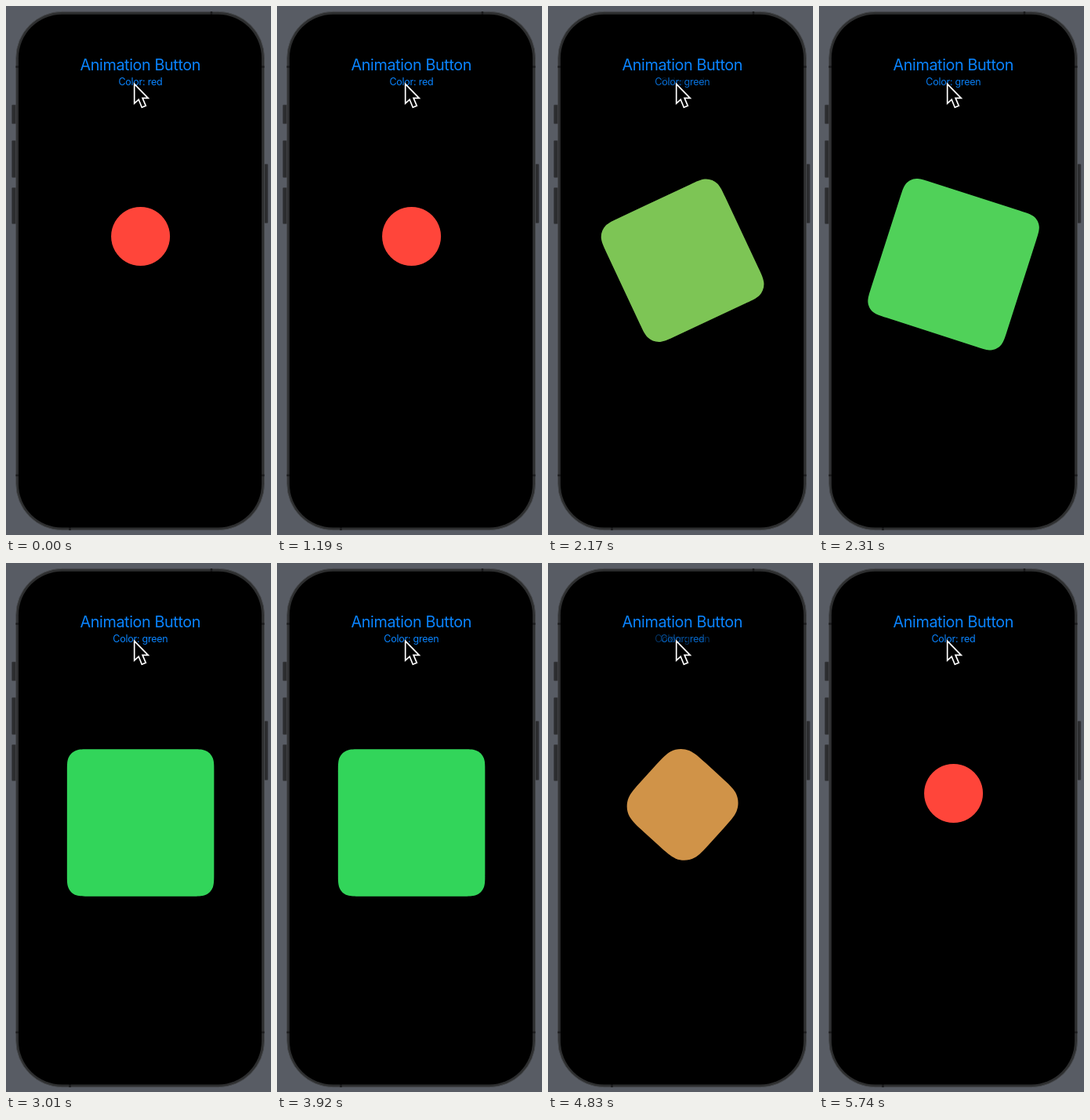
Recreate the animation shown at these times as an HTML page. Size 338x674 px, loop 5880 ms.

```html
<!DOCTYPE html>
<html lang="en">
<head>
<meta charset="utf-8">
<title>Animation Button</title>
<style>
  html, body { margin: 0; width: 100%; height: 100%; overflow: hidden; background: #585c64; }
  svg { display: block; width: 338px; height: 674px; }
  text {
    font-family: Inter, Roboto, sans-serif;
    letter-spacing: -0.02em;
    text-anchor: middle;
    fill: #0a84ff;
  }
  .title { font-size: 19.8px; }
  .label { font-size: 12.5px; }
</style>
</head>
<body>
<svg viewBox="0 0 338 674">
  <g fill="#2c2d2f" stroke="#3d3f43" stroke-width=".6">
    <rect x="7.5" y="126" width="6" height="24" rx="1"/>
    <rect x="7.5" y="171.5" width="6" height="47" rx="1"/>
    <rect x="7.5" y="231.5" width="6" height="46" rx="1"/>
    <rect x="329" y="201.5" width="5" height="75" rx="1"/>
  </g>
  <rect x="12.8" y="7.3" width="316.7" height="660.4" rx="59" fill="#2d2e2f" stroke="#484a4d" stroke-width=".9"/>
  <path d="M12.5 77.5h3.5M326 77.5h3.5M12.5 598h3.5M326 598h3.5M262 7v4M81.5 664v4" stroke="#1b1b1c" stroke-width="2.5"/>
  <rect x="16" y="10.8" width="310" height="653.6" rx="55.5"/>
  <text class="title" x="171.3" y="82.3">Animation Button</text>
  <text class="label" id="red" x="171.4" y="101.4">Color: red</text>
  <text class="label" id="green" x="171.4" y="101.4">Color: green</text>
  <path id="shape"/>
  <path d="M163.7 99.3V124.2L169.2 119.2L173.3 129.2L178.3 127.1L174.1 117.3H181.3Z" fill="#000" stroke="#fff" stroke-width="1.7"/>
</svg>
<script>
const LOOP = 5880, STEP = 70;
const GROW = 1900, SHRINK = 4650, OMEGA = 11.6;
const RED = [255, 69, 58], GREEN = [50, 213, 90];
const CX = 171.6;

// One corner, as distances from its tip: three cubics, in units of the radius.
const ROUND = [[1, 0], [.8245, 0], [.652, .0462], [.5, .134], [.348, .2218]];
const SMOOTH = [[1.52866, 0], [1.08849, 0], [.86841, 0], [.63149, .07491], [.37282, .16906]];

const [red, green, shape] = ['red', 'green', 'shape'].map(id => document.getElementById(id));
const mix = (a, b, k) => a + (b - a) * k;

// Critically damped spring from 0 to 1
function spring(ms) {
  const x = Math.max(0, ms) / 1000 * OMEGA;
  return 1 - Math.exp(-x) * (1 + x);
}

function cornerPoints(half, r) {
  const k = Math.min(1, Math.max(0, (half / r - 1) / .52866));
  const first = ROUND.map((p, i) => p.map((v, j) => mix(v, SMOOTH[i][j], k) * r));
  return first.concat(first.map(([x, y]) => [y, x]).reverse());
}

function roundedSquare(size, radius) {
  const half = size / 2;
  const points = cornerPoints(half, Math.min(radius, half));
  let d = '';
  for (let side = 0; side < 4; side++) {
    const c = Math.round(Math.cos(side * Math.PI / 2));
    const s = Math.round(Math.sin(side * Math.PI / 2));
    const at = points.map(([u, v]) => {
      const x = half - u, y = v - half;
      return `${(x * c - y * s).toFixed(2)} ${(x * s + y * c).toFixed(2)}`;
    });
    d += (side ? 'L' : 'M') + at[0] + 'C' + at.slice(1).join(' ');
  }
  return d + 'Z';
}

// Colours blend in linear light
const toLinear = v => (v /= 255) <= .04045 ? v / 12.92 : ((v + .055) / 1.055) ** 2.4;
const toSrgb = v => 255 * (v <= .0031308 ? v * 12.92 : 1.055 * v ** (1 / 2.4) - .055);
const blend = k => `rgb(${RED.map((v, i) =>
  Math.round(toSrgb(mix(toLinear(v), toLinear(GREEN[i]), k))))})`;

function draw(t) {
  const p = t < SHRINK ? spring(t - GROW) : 1 - spring(t - SHRINK);
  shape.setAttribute('d', roundedSquare(mix(75, 187.5, p), mix(37.5, 18.75, p)));
  shape.setAttribute('transform',
    `translate(${CX} ${mix(293.5, 331, p)}) rotate(${360 * (1 - p)})`);
  shape.setAttribute('fill', blend(p));
  red.setAttribute('opacity', 1 - p);
  green.setAttribute('opacity', p);
}

function tick() {
  const t = (performance.now() + 6) % LOOP;
  draw(Math.floor(t / STEP) * STEP);
  requestAnimationFrame(tick);
}
tick();
</script>
</body>
</html>
```
